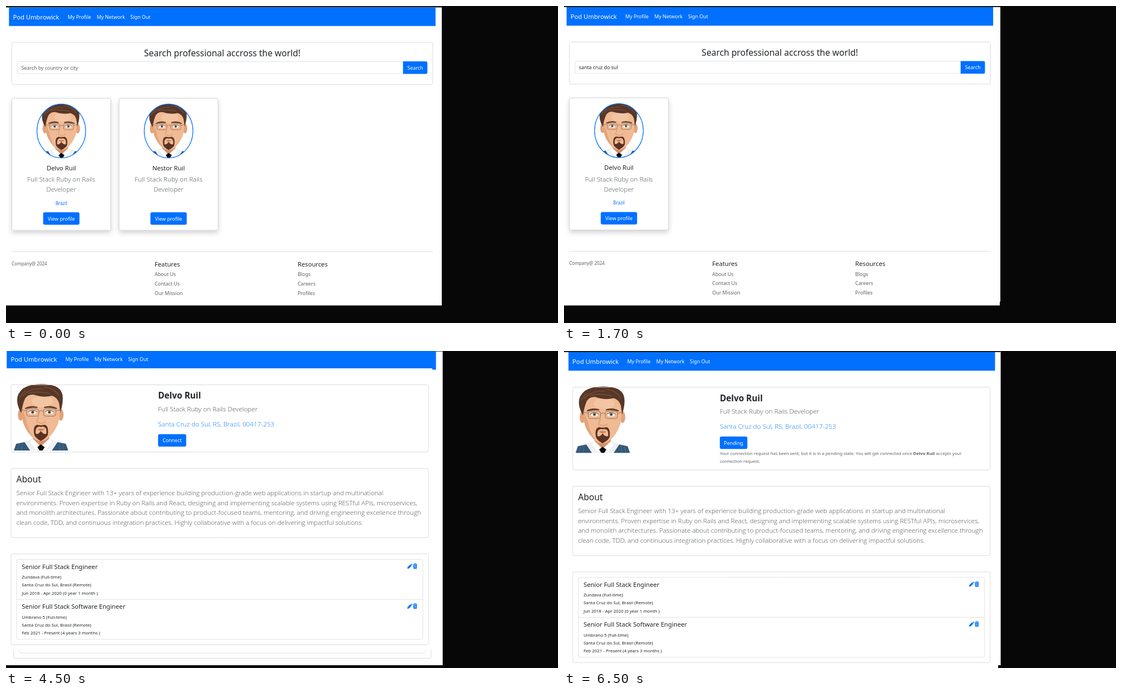
Recreate the animation shown at these times as an HTML page with a canvas. Size 988 by 567 pixels, loop 8000 ms.

```html
<!DOCTYPE html>
<html lang="en">
<head>
<meta charset="utf-8">
<title>Profile search</title>
<style>
html, body { margin: 0; width: 100%; height: 100%; overflow: hidden; background: #070707; }
canvas { display: block; }
</style>
</head>
<body>
<canvas id="stage" width="988" height="567"></canvas>
<script>
const ctx = document.getElementById('stage').getContext('2d');

const BLUE = '#0070ff', INK = '#212529', MUTED = '#5c6064', SOFT = '#4b4f53', LINE = '#dadcde';
const SANS = '"Noto Sans", sans-serif';
const font = (size, style = '400') => `${style} ${size}px ${SANS}`;
const BASE = font(8.9), SMALL = font(7.85), TITLE = font(11.2, '500'), BRAND = font(11.2);
const HEAD = font(15.6);
const light = size => `300 ${size}px "Open Sans", "Noto Sans", sans-serif`;
const LEAD = light(11.7), BODY = light(11.52);

const NAME = 'Delvo Ruil';
const JOB = 'Full Stack Ruby on Rails Developer';
const ABOUT = [
  'Senior Full Stack Engineer with 13+ years of experience building production-grade web applications in startup and multinational',
  'environments. Proven expertise in Ruby on Rails and React, designing and implementing scalable systems using RESTful APIs, microservices,',
  'and monolith architectures. Passionate about contributing to product-focused teams, mentoring, and driving engineering excellence through',
  'clean code, TDD, and continuous integration practices. Highly collaborative with a focus on delivering impactful solutions.'
];
const JOBS = [
  ['Senior Full Stack Engineer', 'Zundava (Full-time)', 'Santa Cruz do Sul, Brasil (Remote)', 'Jun 2018 - Apr 2020 (0 year 1 month )'],
  ['Senior Full Stack Software Engineer', 'Umbrano 5 (Full-time)', 'Santa Cruz do Sul, Brasil (Remote)', 'Feb 2021 - Present (4 years 3 months )']
];

function rect(x, y, w, h, color) {
  ctx.fillStyle = color;
  ctx.fillRect(x, y, w, h);
}

function text(str, x, y, style, color = INK, align = 'left') {
  ctx.font = style;
  ctx.fillStyle = color;
  ctx.textAlign = align;
  ctx.fillText(str, x, y);
  return ctx.measureText(str).width;
}

function box(x, y, w, h, r = 3, stroke = LINE) {
  ctx.beginPath();
  ctx.roundRect(x, y, w, h, r);
  ctx.strokeStyle = stroke;
  ctx.lineWidth = 1;
  ctx.stroke();
}

function button(label, x, y, w, h, r = 3) {
  ctx.beginPath();
  ctx.roundRect(x, y, w, h, r);
  ctx.fillStyle = BLUE;
  ctx.fill();
  text(label, x + w / 2, y + h / 2 + 3.4, BASE, '#fff', 'center');
}

function at(x, y, draw, scale = 1) {
  ctx.save();
  ctx.translate(x, y);
  ctx.scale(scale, scale);
  draw();
  ctx.restore();
}

function shape(d, fill, stroke, width = 1) {
  const p = new Path2D(d);
  if (fill) { ctx.fillStyle = fill; ctx.fill(p); }
  if (stroke) { ctx.strokeStyle = stroke; ctx.lineWidth = width; ctx.stroke(p); }
}

function oval(x, y, rx, ry, fill) {
  ctx.beginPath();
  ctx.ellipse(x, y, rx, ry, 0, 0, Math.PI * 2);
  ctx.fillStyle = fill;
  ctx.fill();
}

function pencil(x, y) {
  at(x, y, () => shape('M0 9.4L.6 6.4 5.5 1.5 7.9 3.9 3 8.8ZM6.2 .9Q7.3-.2 8.3 .8L8.7 1.2Q9.6 2.1 8.5 3.2Z', BLUE));
}

function trash(x, y) {
  at(x, y, () => {
    shape('M0 1.1H2.4L2.9 .3H5.1L5.6 1.1H8V2.3H0ZM.6 3H7.4L7 9.2Q6.9 9.8 6.2 9.8H1.8Q1.1 9.8 1 9.2Z', BLUE);
    shape('M2.6 4.2V8.5M4 4.2V8.5M5.4 4.2V8.5', null, '#fff', .5);
  });
}

function portrait() {
  // clothes and neck
  shape('M3 118Q6 106 14 104L36 98H70L92 104Q101 107 104 118Z', '#f0f1f4');
  shape('M5 118L9 106 24 103 34 118ZM102 118L98 106 83 103 73 118Z', '#345878');
  shape('M11 118L14 106M18 118L20 105M95 118L92 106M88 118L86 105', null, '#54789a', .8);
  shape('M39 84H68V102L53 113 39 102Z', '#d68f67');
  shape('M38 96L53 111 44 118 33 103ZM69 96L53 111 62 118 74 103Z', '#fff', '#d5d9e0', .6);
  shape('M47 112L53 107 60 112 56 118H51Z', '#0b0c10');

  // face
  oval(17, 54, 4.8, 10.5, '#e2a27a');
  oval(89, 54, 4.8, 10.5, '#e2a27a');
  shape('M18 36Q20 18 38 15L70 14Q87 18 88 36L86 62Q83 78 70 92 62 101 53 101 44 101 36 92 23 78 20 62Z', '#efba94');
  shape('M18 38L20 62Q23 78 36 92L41 97Q29 78 27 63Z', '#e3a57d');
  oval(56, 30, 19, 10, '#f3c5a2');

  // hair and brows
  shape('M18 51L14 43Q8 28 13 17 20 4 36 1 58-4 79 3 90 8 92 19 94 31 88 50L86 34Q83 23 73 20 57 24 40 18 30 17 25 25 21 33 18 51Z', '#573727');
  shape('M20 21Q34 5 57 8M30 15Q50 11 70 16M58 4Q76 5 86 20M15 25Q18 16 26 11', null, '#79503a', 1.3);
  shape('M25 42Q35 36 47 40L47 42Q36 40 25 44ZM59 40Q71 36 82 42L82 44Q71 40 59 42Z', '#5d3b2a');

  // eyes and glasses
  for (const x of [38.5, 68.5]) {
    oval(x, 49.5, 7, 3.4, '#fff');
    oval(x, 49.3, 3, 3, '#8b8678');
    oval(x, 49.3, 1.4, 1.4, '#222');
    shape(`M${x - 8} 49Q${x} 43 ${x + 8} 49`, null, '#5c3a2c', .9);
  }
  ctx.beginPath();
  ctx.roundRect(27.5, 43.5, 22, 13, 4);
  ctx.roundRect(58, 43.5, 22, 13, 4);
  ctx.strokeStyle = '#8c6658';
  ctx.lineWidth = .9;
  ctx.stroke();
  shape('M49.5 48Q53.7 45 58 48M27.5 47L18 45M80 47L89 45', null, '#8c6658', .9);

  // nose, mouth and beard
  shape('M49 54Q49 61 46 65 46 69 50 68L54 70 58 68Q62 69 61 65', null, '#d59870', 1.2);
  shape('M41 88Q39 73 47 72L53 73 60 72Q67 73 66 88 66 94 53 101 41 94 41 88Z', '#5a3223');
  shape('M46 77Q43 80 44 88 49 90 53 83 58 90 63 88 64 80 61 77 57 74 53 76 50 74 46 77Z', '#efba94');
  shape('M47 80Q53 78 60 80 53 85 47 80Z', '#c8785e');
}

function navbar() {
  rect(5.3, 2.6, 763.5, 33.2, BLUE);
  text('Pod Umbrowick', 12.4, 24, BRAND, '#fff');
  text('My Profile', 110.5, 23, BASE, '#fff');
  text('My Network', 162.4, 23, BASE, '#fff');
  text('Sign Out', 222.6, 23, BASE, '#fff');
}

function avatar(cx) {
  const ring = new Path2D();
  ring.ellipse(cx, 223.5, 43.6, 48.2, 0, 0, Math.PI * 2);
  ctx.save();
  ctx.clip(ring);
  at(cx - 43.5, 175, portrait, .82);
  ctx.restore();
  ctx.strokeStyle = BLUE;
  ctx.lineWidth = 1.2;
  ctx.stroke(ring);
}

function person(x, name, country) {
  ctx.save();
  ctx.shadowColor = 'rgba(0,0,0,.17)';
  ctx.shadowBlur = 9.4;
  ctx.shadowOffsetY = 4.7;
  ctx.beginPath();
  ctx.roundRect(x, 164.5, 178, 237, 3);
  ctx.fillStyle = '#fff';
  ctx.fill();
  ctx.restore();
  box(x + .4, 165, 177.2, 236.2, 3, '#d2d4d6');

  const cx = x + 89;
  avatar(cx);
  text(name, cx, 293.5, TITLE, INK, 'center');
  text('Full Stack Ruby on Rails', cx, 314.4, LEAD, SOFT, 'center');
  text('Developer', cx, 332.1, LEAD, SOFT, 'center');
  if (country) text(country, cx, 356, font(8), BLUE, 'center');
  button('View profile', cx - 32.5, 369, 65, 22.3);
}

function links(x, title, items) {
  text(title, x, 466, TITLE);
  items.forEach((s, i) => text(s, x, 483.3 + i * 16.6, font(8.85), MUTED));
}

function searchPage(query) {
  navbar();
  box(10.4, 65, 753.4, 75.5);
  text('Search professional accross the world!', 387, 90, HEAD, INK, 'center');
  box(20.4, 99.4, 691, 21.8, 3, '#dfe2e6');
  text(query || 'Search by country or city', 27.5, 113.8, font(8.8), query ? INK : MUTED);
  button('Search', 710.6, 99, 43.6, 22.5, [0, 3, 3, 0]);
  person(10, NAME, 'Brazil');
  if (!query) person(202, 'Nestor Ruil');
  rect(10, 439, 754, 1, '#dcdddf');
  text('Company@ 2024', 10, 463.5, font(8), MUTED);
  links(266, 'Features', ['About Us', 'Contact Us', 'Our Mission']);
  links(522, 'Resources', ['Blogs', 'Careers', 'Profiles']);
}

function underlined(str, x, y, style) {
  const w = text(str, x, y, style, BLUE);
  rect(x, y + 1.2, w, .7, BLUE);
}

function jobList(y) {
  box(23.8, y, 727, 143, 3, '#e0e2e4');
  rect(24, y + 71, 727, 1, '#e0e2e4');
  JOBS.forEach(([title, ...rows], i) => {
    const top = y + i * 71.4;
    text(title, 33.1, top + 16.8, TITLE);
    rows.forEach((s, k) => text(s, 33.1, top + 34.3 + k * 14.2, SMALL));
    pencil(723, top + 7.4);
    trash(733, top + 7);
  });
}

// status: undefined for the owner's own view, else the connection state
function profilePage(status) {
  const grow = status === 'Pending' ? 30.3 : status ? 2.4 : 0;
  at(.8, -2.4, navbar);
  at(14, 62.5, portrait);
  box(13.9, 62.8, 747, 118 + grow);
  text(NAME, 277, 87.7, font(15.3, '700'));
  text(JOB, 277, 110.4, LEAD, SOFT);
  text('Santa Cruz do Sul, RS, Brazil, 00417-253', 277, 137.6, LEAD, '#0d7bff');
  if (status) button(status, 277, 151.2, status === 'Pending' ? 49.3 : 50.3, 22.2);
  else pencil(277, 153.3);
  if (status === 'Pending') {
    const note = font(7.72);
    let x = 277;
    x += text('Your connection request has been sent, but it is in a pending state. You will get connected once ', x, 184, note, MUTED);
    x += text(NAME, x, 184, font(7.72, '700'), MUTED);
    text(' accepts your', x, 184, note, MUTED);
    text('connection request.', 277, 198.2, note, MUTED);
  }

  at(0, grow, () => {
    box(13.9, 209.8, 747, 124);
    text('About', 23.3, 235.3, HEAD);
    ABOUT.forEach((s, i) => text(s, 23.3, 257.9 + i * 17.7, BODY, SOFT));
    if (!status) pencil(742, 222);
    box(13.9, 363, 747, status ? 162.3 : 186.6);
    if (!status) {
      text('Work Experience', 23.3, 388.5, HEAD);
      text('+', 272.8, 383.2, BASE, BLUE);
      underlined('Add Experience', 280.3, 383.2, font(9.2, 'italic'));
      underlined('Edit Experience', 518.3, 383.2, BASE);
    }
    jobList(status ? 372.8 : 397.2);
  });
}

function backdrop(right, bottom, strip) {
  rect(0, 0, 988, 567, '#070707');
  rect(0, 0, right, bottom, '#fff');
  rect(0, 0, right, strip, '#1d1e20');
}

function ownProfile() {
  backdrop(781.6, 562, .8);
  profilePage();
}

const scenes = [
  [500, () => {
    backdrop(780, 535.6, 2.6);
    searchPage();
  }],
  [2500, () => {
    backdrop(780, 535.6, 2);
    rect(780, 2, 1, 527, '#fff');
    at(-.7, -.6, () => searchPage('santa cruz do sul'));
  }],
  [4500, ownProfile],
  [6500, () => {
    // the new view covers only part of the previous one
    ownProfile();
    ctx.save();
    ctx.beginPath();
    ctx.rect(0, 0, 763, 534);
    ctx.clip();
    rect(0, 0, 763, 534, '#fff');
    at(-4.8, -2.4, () => profilePage('Connect'));
    ctx.restore();
  }],
  [8000, () => {
    backdrop(781.6, 562, 2);
    rect(0, 562, 777, 5, '#fff');
    at(1.9, 1.8, () => profilePage('Pending'));
  }]
];

const start = performance.now();
let shown = null;

function tick() {
  const t = (performance.now() - start) % 8000;
  const scene = scenes.find(([end]) => t < end);
  if (scene !== shown) {
    shown = scene;
    scene[1]();
  }
  requestAnimationFrame(tick);
}
tick();
</script>
</body>
</html>
```
